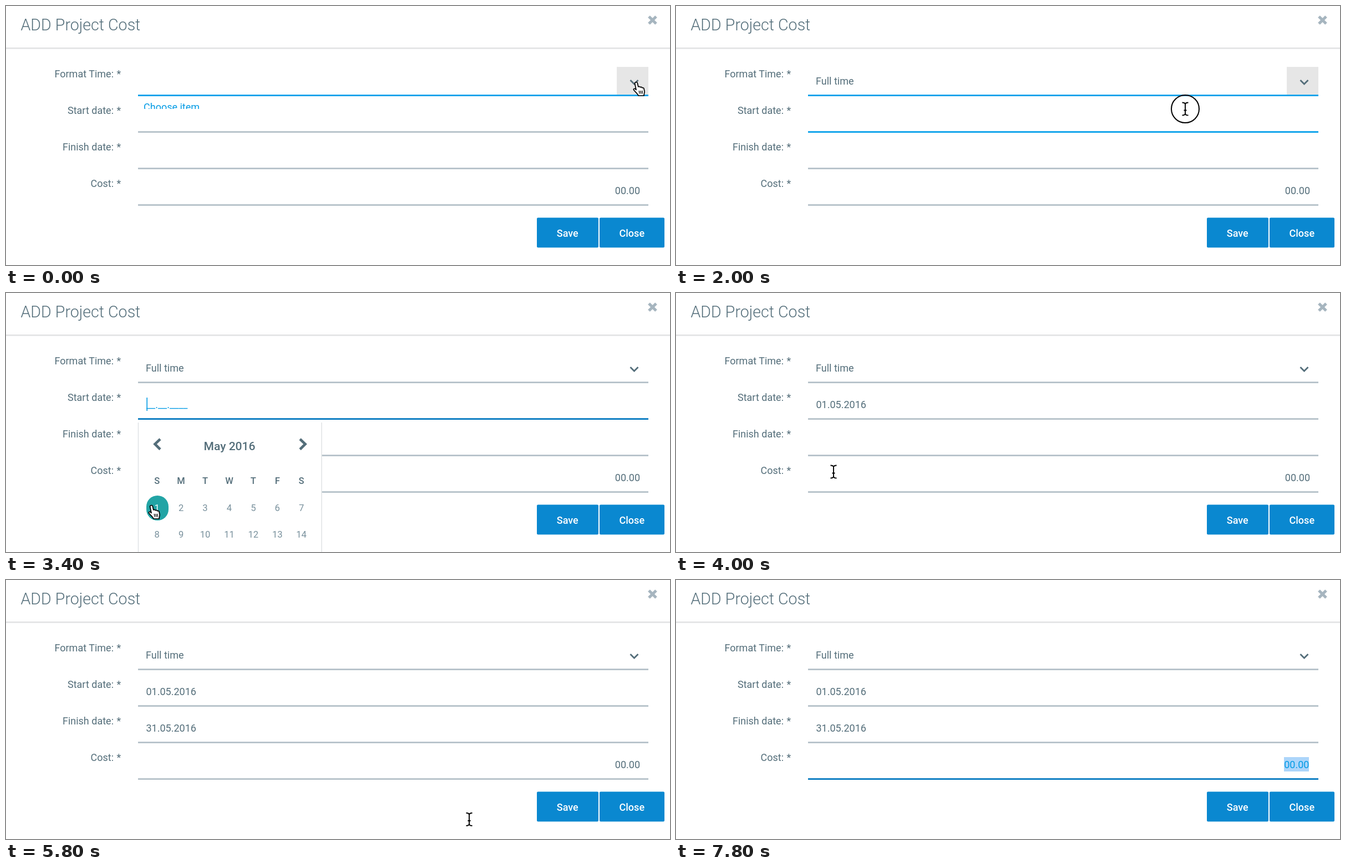
Animation, 1197 px wide and 468 px high, one loop 8 s. Source, as an HTML page:

```html
<!DOCTYPE html>
<html lang="en">
<head>
<meta charset="utf-8">
<title>Add project cost</title>
<style>
  html, body { margin: 0; width: 100%; height: 100%; overflow: hidden; background: #fff; }
  svg { display: block; width: 1197px; height: 468px; }
  text { font: 400 18px Roboto, sans-serif; fill: #546e7a; white-space: pre; }
  .title { font-size: 28.6px; font-weight: 300; }
  .medium { font-weight: 500; }
  .month { font-size: 21px; font-weight: 500; }
  .weekday { font-size: 16.5px; font-weight: 500; }
  .day { font-size: 16.5px; fill: #78909c; }
  .white { fill: #fff; }
  .blue { fill: #039be5; }
  .mid { text-anchor: middle; }
  .end { text-anchor: end; }
  .icon { fill: none; stroke: #546e7a; }
</style>
</head>
<body>
<svg id="stage" viewBox="0 0 1197 468"></svg>
<script>
const LOOP = 8000, STEP = 200;
const GREY = '#b5c1c9', BLUE = '#06a0ea', DEEP = '#0479c0', FADING = '#5f9fc2';
const stage = document.getElementById('stage');

function add(tag, attrs = {}, parent = stage, content = '') {
  const el = document.createElementNS('http://www.w3.org/2000/svg', tag);
  for (const key in attrs) el.setAttribute(key, attrs[key]);
  if (content) el.textContent = content;
  return parent.appendChild(el);
}
const text = (x, y, content, cls = '', parent = stage) => add('text', { x, y, class: cls }, parent, content);
const rect = (x, y, width, height, fill, parent = stage) => add('rect', { x, y, width, height, fill }, parent);
const path = (d, attrs, parent = stage) => add('path', { d, ...attrs }, parent);
const show = (el, on) => el.setAttribute('visibility', on ? 'inherit' : 'hidden');

// Dialog frame
text(26.5, 44, 'ADD Project Cost', 'title');
path('M1159 19l13 13M1172 19l-13 13', { stroke: '#a6b5bf', 'stroke-width': 5.2 });
rect(0, 75, 1197, 2.6, '#e2e3e4');

// Form rows
const arrowButton = rect(1101, 110, 57, 50, '#e6e6e6');
path('M1125.5 134l7 7 7-7', { class: 'icon', 'stroke-width': 2.8 });
const lines = ['Format Time:', 'Start date:', 'Finish date:', 'Cost:'].map((label, i) => {
  const y = 66 * i;
  text(194, 129 + y, label, 'end');
  text(199.6, 129 + y, '*');
  return rect(238, 160.2 + y, 920, 2.8, GREY);
});
const format = text(252, 142, 'Full time');
const startDate = text(252.5, 208, '01.05.2016');
const finishDate = text(252.5, 274, '31.05.2016');
const selection = rect(1096, 320, 45, 26, '#acd5fa');
const cost = text(1143, 340, '00.00', 'end');
const costCaret = rect(1142, 321, 1.5, 25, '#039be5');

function dateMask(y) {
  const group = add('g');
  text(253, y, '__.__.____', 'blue', group);
  rect(253.4, y - 19, 1.6, 24, '#039be5', group);
  return group;
}
const masks = [dateMask(208), dateMask(274)];

for (const [x, width, label] of [[957, 111, 'Save'], [1070, 117, 'Close']]) {
  add('rect', { x, y: 382.5, width, height: 54, rx: 2, fill: '#0a88d0' });
  text(x + width / 2 - .2, 417, label, 'medium white mid');
}

// Option list
const clip = add('clipPath', { id: 'reveal' }, add('defs'));
const reveal = rect(230, 163, 936, 0, '#000', clip);
const list = add('g', { 'clip-path': 'url(#reveal)' });
rect(239, 163, 919, 196, '#fff', list);
const listEdge = add('g', {}, list);
path('M238.5 163V360M1158 163V360', { stroke: '#dcdfe1', 'stroke-width': 1.5 }, listEdge);
rect(238, 358.2, 920, 2.8, '#9caab3', listEdge);
['Choose item', 'Full time', 'By time', 'By specification', 'New Format Time']
  .forEach((option, i) => text(248, 189 + 39 * i, option, i ? '' : 'blue', list));

// Date picker
const picker = add('g');
rect(238, 229.5, 331, 300, '#fff', picker);
path('M238.5 234V500M569 234V500', { stroke: '#dfe3e5', 'stroke-width': 1.5 }, picker);
path('M278 264l-9.5 9 9.5 9.5M530 264l9.5 9-9.5 9.5', { class: 'icon', 'stroke-width': 4.6 }, picker);
text(403, 284, 'May 2016', 'month mid', picker);
const hover = add('rect', { x: 253, y: 366, width: 40, height: 45, rx: 20, fill: '#22a4a5' }, picker);
const dayX = i => 272.2 + 43.4 * i;
[...'SMTWTFS'].forEach((name, i) => text(dayX(i), 345, name, 'weekday mid', picker));
const days = Array.from({ length: 14 }, (_, i) =>
  text(dayX(i % 7), 394 + 48 * Math.floor(i / 7), String(i + 1), 'day mid', picker));

// Pointer
const pointer = add('g');
const ring = add('circle', { r: 25, fill: 'none', stroke: '#000', 'stroke-width': 2 }, pointer);
const hand = add('g', { transform: 'translate(-5 -1)' }, pointer);
path('M5 1C6.5 0 8 .8 8.4 2.5L9.8 9C11 8 12.8 8.3 13.2 9.8C14.4 8.9 16.2 9.4 16.6 10.8' +
  'C18 10.2 19.6 10.9 20 12.3L21 17C21.4 20 20 21.5 20 25H10C9 21.5 4 18 1.5 14.5' +
  'C.8 13 2.5 11.7 4 12.6L6 14.5L3.7 3.5C3.4 2.3 4 1.3 5 1Z',
  { fill: '#fff', stroke: '#000', 'stroke-width': 1.7, 'stroke-linejoin': 'round' }, hand);
path('M11.3 16l.7 5.5M14.2 16l.5 5.5M17 16l.3 5.5', { stroke: '#000', 'stroke-width': 1.3 }, hand);
const beam = add('g', { fill: 'none' }, pointer);
for (const [stroke, width] of [['#fff', 4], ['#000', 1.9]])
  path('M-5.5 -11.5Q0 -11.5 0 -8Q0 -11.5 5.5 -11.5M0 -8V8M-5.5 11.5Q0 11.5 0 8Q0 11.5 5.5 11.5M-2.5 2.5H2.5',
    { stroke, 'stroke-width': width }, beam);

// time, x, y, shape
const route = [
  [0, 1135, 138, 'hand'], [200, 1120, 148, 'hand'], [800, 864, 213, 'hand'],
  [1400, 864, 213, 'hand'], [1600, 880, 205, 'beam'], [1800, 918, 186, 'beam'],
  [2400, 918, 186, 'beam'], [2600, 780, 238, 'beam'], [2800, 520, 320, 'hand'],
  [3200, 261, 384, 'hand'], [3600, 261, 384, 'hand'], [3800, 268, 376, 'beam'],
  [4200, 300, 270, 'beam'], [4800, 300, 270, 'beam'], [5000, 310, 400, 'hand'],
  [5200, 315, 500, 'hand'], [5600, 640, 500, 'beam'], [6000, 1030, 365, 'beam'],
  [6200, 1112, 338, 'beam'], [6600, 1115, 285, 'beam'], [6800, 1118, 296, 'beam'],
  [7000, 1125, 334, 'beam'], [7400, 1125, 334, 'beam'], [7600, 1172, 350, 'beam'],
  [7800, 1230, 365, 'beam'], [8000, 1230, 365, 'beam']
];
const clicks = [1400, 2000, 3600, 4400, 6200, 7200];

// Each line: [time, colour] changes
const lineColours = [
  [[0, BLUE], [2200, '#6fb5d8'], [2400, GREY]],
  [[0, GREY], [2000, BLUE], [2200, DEEP], [3600, FADING], [3800, GREY]],
  [[0, GREY], [4400, BLUE], [4600, DEEP], [5400, FADING], [5600, GREY]],
  [[0, GREY], [6200, BLUE], [6400, DEEP]]
];
const current = (table, t) => table.filter(row => row[0] <= t).pop();

function movePointer(t) {
  const from = current(route, t);
  const to = route[route.indexOf(from) + 1];
  const k = (t - from[0]) / (to[0] - from[0]);
  const at = i => from[i] + (to[i] - from[i]) * k;
  pointer.setAttribute('transform', `translate(${at(1)} ${at(2)})`);
  show(hand, from[3] === 'hand');
  show(beam, from[3] === 'beam');
  show(ring, clicks.includes(t));
}

function draw(t) {
  const between = (a, b) => t >= a && t < b;
  lines.forEach((line, i) => line.setAttribute('fill', current(lineColours[i], t)[1]));

  show(arrowButton, t < 2400);
  show(format, t >= 1600);
  show(list, t < 1600);
  show(listEdge, t > 0);
  reveal.setAttribute('height', t ? Math.min(198, 23 + t * .8) : 23);

  show(masks[0], between(2400, 3600));
  show(masks[1], between(4600, 5400));
  show(startDate, t >= 3600);
  show(finishDate, t >= 5600);

  const second = between(4800, 5600);
  show(picker, between(2400, 3600) || second);
  picker.setAttribute('transform', `translate(0 ${second ? 66 : 0})`);
  const hovered = between(3200, 3600);
  show(hover, hovered);
  days[0].setAttribute('class', hovered ? 'day mid white' : 'day mid');

  const selected = t >= 7400;
  show(selection, selected);
  show(costCaret, between(6400, 7400));
  cost.setAttribute('class', t >= 6400 ? 'end blue' : 'end');
  cost.setAttribute('x', selected ? 1141.4 : 1143);

  movePointer(t);
}

const began = performance.now();
function tick() {
  const t = (performance.now() - began) % LOOP;
  draw(Math.floor(t / STEP) * STEP);
  requestAnimationFrame(tick);
}
tick();
</script>
</body>
</html>
```
